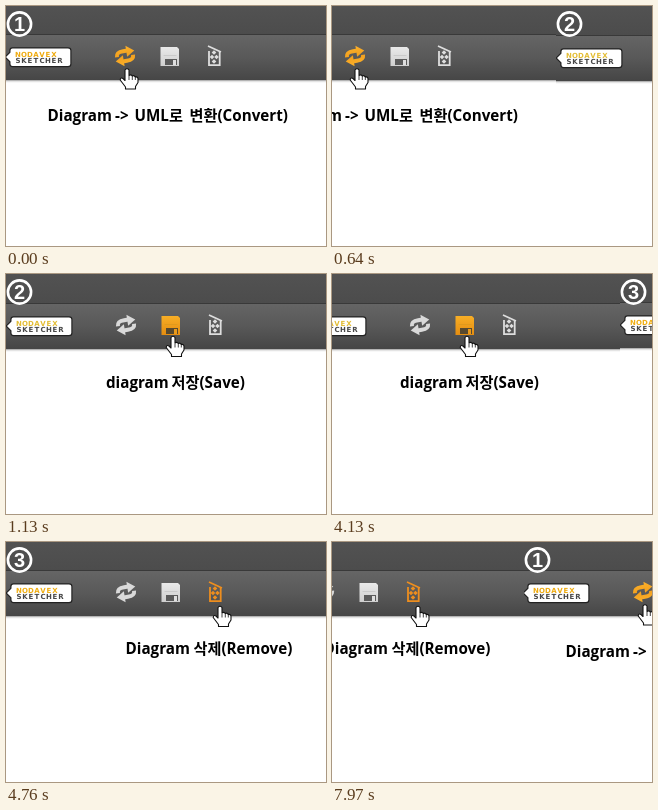
These frames come from a looping animation (320 by 240 pixels, 8000 ms). An HTML page with a canvas:

```html
<!DOCTYPE html>
<html lang="ko">
<head>
<meta charset="utf-8">
<title>Toolbar guide</title>
<style>
html, body { margin: 0; width: 100%; height: 100%; overflow: hidden; background: #fff; }
canvas { display: block; width: 320px; height: 240px; }
</style>
</head>
<body>
<canvas id="stage" width="320" height="240"></canvas>
<script>
const ctx = document.getElementById('stage').getContext('2d');
const W = 320, H = 240, LOOP = 8000;
const STEP_MS = 70, STEP_PX = 32, STEPS = 10;
const MOVES = [500, 4130, 7760];
const FONT = '"Open Sans", "Noto Sans CJK KR", "Noto Sans CJK", sans-serif';

const SLIDES = [
  { dx: 0, dy: 0, hand: [121, 62.5], base: 115, gold: '#efab10',
    words: [['Diagram', 41.5], ['->', 109], ['UML로', 128.5], ['변환(Convert)', 183.5]] },
  { dx: 1, dy: 1, hand: [167, 62], base: 114, gold: '#e3bd35',
    words: [['diagram', 100], ['저장(Save)', 165.5]] },
  { dx: 1, dy: 0, hand: [214, 64], base: 112, gold: '#f0ae12',
    words: [['Diagram', 119.5], ['삭제(Remove)', 187.5]] }
];

function rect(x, y, w, h, color) {
  ctx.fillStyle = color;
  ctx.fillRect(x, y, w, h);
}

function shade(y0, y1, ...colors) {
  const g = ctx.createLinearGradient(0, y0, 0, y1);
  colors.forEach((c, i) => g.addColorStop(i / (colors.length - 1), c));
  return g;
}

function poly(points, color) {
  ctx.beginPath();
  points.forEach(([x, y]) => ctx.lineTo(x, y));
  ctx.closePath();
  ctx.fillStyle = color;
  ctx.fill();
}

function at(x, y, draw) {
  ctx.save();
  ctx.translate(x, y);
  draw();
  ctx.restore();
}

function header(dy) {
  rect(0, 0, W, 29 + dy, shade(0, 29, '#525252', '#4c4c4c'));
  rect(0, 28 + dy, W, 1, '#393939');
  rect(0, 29 + dy, W, 45, shade(29, 74, '#656565', '#595959', '#464646'));
  rect(0, 74 + dy, W, 1, '#b4b4b4');
  rect(0, 75 + dy, W, 1, '#e4e4e4');
  rect(0, 76 + dy, W, 1, '#f8f8f8');
}

function badge(n) {
  ctx.strokeStyle = ctx.fillStyle = '#fff';
  ctx.lineWidth = 2.6;
  ctx.beginPath();
  ctx.arc(13.5, 18, 11.6, 0, Math.PI * 2);
  ctx.stroke();
  ctx.font = '700 20px "Liberation Sans", sans-serif';
  ctx.textAlign = 'center';
  ctx.fillText(n, 13.5, 25);
}

function spaced(text, x, y, color) {
  ctx.font = '700 7px "DejaVu Sans", sans-serif';
  ctx.textAlign = 'center';
  ctx.fillStyle = color;
  [...text].forEach((c, i) => ctx.fillText(c, x + i * 6, y));
}

function tag(gold) {
  ctx.beginPath();
  ctx.moveTo(0, 51);
  ctx.lineTo(4.5, 46.5);
  ctx.lineTo(4.5, 44.5);
  ctx.quadraticCurveTo(4.5, 42.5, 6.5, 42.5);
  ctx.lineTo(62, 42.5);
  ctx.quadraticCurveTo(64.3, 42.5, 64.3, 44.5);
  ctx.lineTo(64.3, 58);
  ctx.quadraticCurveTo(64.3, 60, 62, 60);
  ctx.lineTo(6.5, 60);
  ctx.quadraticCurveTo(4.5, 60, 4.5, 58);
  ctx.lineTo(4.5, 55.5);
  ctx.closePath();
  ctx.strokeStyle = '#222';
  ctx.lineWidth = 2.4;
  ctx.stroke();
  ctx.fillStyle = '#fff';
  ctx.fill();
  spaced('NODAVEX', 12, 51, gold);
  spaced('SKETCHER', 12, 57.2, '#484848');
}

function arrows(on) {
  const color = on ? shade(-10, 10, '#fbb02a', '#ec9213') : '#d9d9d9';
  ctx.rotate(-0.16);
  for (let i = 0; i < 2; i++) {
    ctx.rotate(i * Math.PI);
    ctx.strokeStyle = color;
    ctx.lineWidth = 4;
    ctx.beginPath();
    ctx.moveTo(-8.2, 0);
    ctx.bezierCurveTo(-8, -4, -6, -5, -1, -5);
    ctx.lineTo(3, -5);
    ctx.stroke();
    poly([[2, -10], [10, -4], [2, 1]], color);
  }
}

function disk(on) {
  const body = on ? shade(-9, 10, '#f7ae26', '#e58d10') : shade(-9, 10, '#e9e9e9', '#cfcfcf');
  poly([[-9, -9], [7.5, -9], [9.5, -7], [9.5, 10], [-9, 10]], body);
  rect(-6, -1, 13, 1, on ? '#e09a1c' : '#cacaca');
  rect(-4.5, 3, 12, 6, on ? '#57492f' : '#5b5b5b');
  rect(3.5, 4, 3, 5, on ? '#e99a1c' : '#dedede');
}

function bin(on) {
  const color = on ? '#ee8e1e' : '#dedede';
  ctx.strokeStyle = color;
  ctx.lineWidth = 1.8;
  ctx.beginPath();
  ctx.moveTo(-6, -10);
  ctx.lineTo(7, -4);
  ctx.moveTo(-5, -5);
  ctx.lineTo(-5, 9.2);
  ctx.lineTo(5.7, 9.2);
  ctx.lineTo(5.7, -4);
  ctx.stroke();
  for (const [x, y] of [[0, -3.5], [-2, 1], [2.5, 1], [0, 5.5]]) {
    poly([[x, y - 2.3], [x + 2.3, y], [x, y + 2.3], [x - 2.3, y]], color);
  }
}

function hand() {
  ctx.beginPath();
  ctx.moveTo(-2, 1.5);
  ctx.quadraticCurveTo(0, -1, 2, 1.5);
  ctx.lineTo(2, 7);
  ctx.quadraticCurveTo(4, 5.5, 5.3, 7.5);
  ctx.quadraticCurveTo(7, 6.5, 8.3, 8.5);
  ctx.quadraticCurveTo(11, 8, 11, 10.5);
  ctx.lineTo(11, 14);
  ctx.lineTo(8.5, 18);
  ctx.lineTo(8.5, 20.5);
  ctx.lineTo(-1.5, 20.5);
  ctx.lineTo(-1.5, 18.5);
  ctx.lineTo(-6.8, 11.5);
  ctx.quadraticCurveTo(-6.5, 8.5, -4, 10);
  ctx.lineTo(-2, 12);
  ctx.closePath();
  ctx.fillStyle = '#fff';
  ctx.fill();
  ctx.strokeStyle = '#111';
  ctx.lineWidth = 1.1;
  ctx.lineJoin = 'round';
  ctx.stroke();
  ctx.lineWidth = 0.8;
  ctx.beginPath();
  for (const x of [2, 5.3, 8.3]) {
    ctx.moveTo(x, 7.5);
    ctx.lineTo(x, 11.5);
  }
  ctx.stroke();
}

function slide(index) {
  const s = SLIDES[index];
  ctx.beginPath();
  ctx.rect(0, 0, W, H);
  ctx.clip();
  rect(0, 0, W, H, '#fff');
  header(s.dy);
  badge(index + 1);
  at(s.dx, s.dy, () => {
    tag(s.gold);
    [arrows, disk, bin].forEach((icon, i) =>
      at([119, 163.5, 208][i], 50, () => icon(i === index)));
  });
  at(...s.hand, hand);
  ctx.font = '700 15.2px ' + FONT;
  ctx.textAlign = 'left';
  ctx.fillStyle = '#000';
  s.words.forEach(([word, x]) => ctx.fillText(word, x, s.base));
}

function scrollAt(t) {
  return MOVES.reduce((sum, start) => {
    const n = Math.floor((t - start) / STEP_MS) + 1;
    return sum + STEP_PX * Math.max(0, Math.min(STEPS, n));
  }, 0);
}

let origin;
function frame(now) {
  origin ??= now;
  const x = scrollAt((now - origin) % LOOP);
  const first = Math.floor(x / W);
  for (let i = first; i <= first + 1; i++) {
    at(i * W - x, 0, () => slide(i % SLIDES.length));
  }
  requestAnimationFrame(frame);
}
requestAnimationFrame(frame);
</script>
</body>
</html>
```
